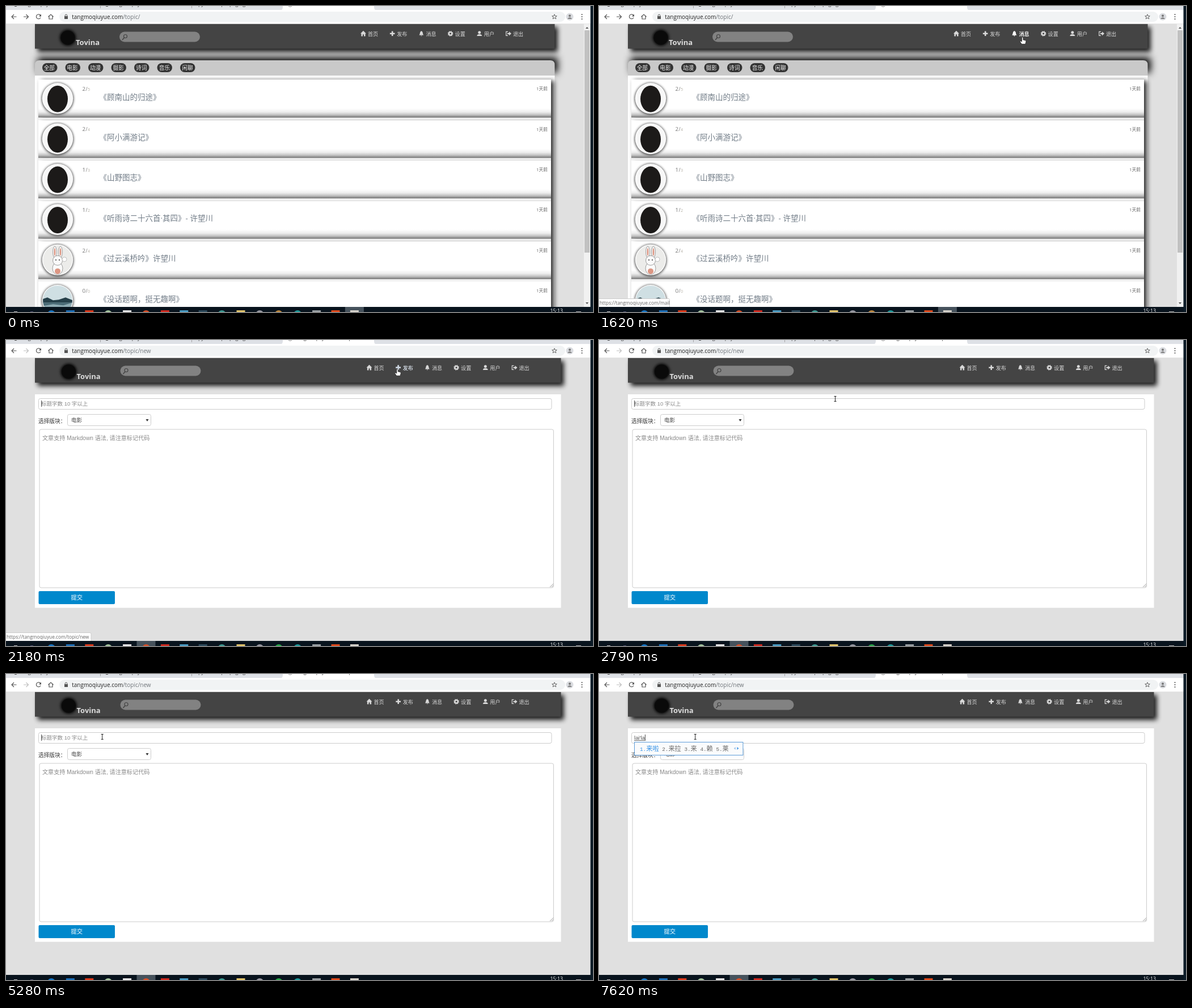
An HTML page for the animation above (8 s loop, 1035x541 px).

```html
<!DOCTYPE html>
<html lang="zh-CN">
<head>
<meta charset="utf-8">
<style>
html, body { margin: 0; width: 100%; height: 100%; overflow: hidden; background: #e0e0e0; }
svg { display: block; width: 1035px; height: 541px; }
text { font-family: "Open Sans", "Noto Sans CJK SC", sans-serif; white-space: pre; }
.form { font-family: "Liberation Sans", "Noto Sans CJK SC", sans-serif; }
.mono { font-family: "Liberation Mono", monospace; }
</style>
</head>
<body>
<svg id="stage" viewBox="0 0 1035 541">
  <defs>
    <linearGradient id="fade" x2="0" y2="1">
      <stop offset="0" stop-opacity="0"/>
      <stop offset=".4" stop-opacity=".07"/>
      <stop offset=".7" stop-opacity=".24"/>
      <stop offset="1" stop-opacity=".55"/>
    </linearGradient>
    <clipPath id="round"><circle r="26"/></clipPath>
  </defs>
  <g id="list"></g>
  <g id="form"></g>
  <g id="live"></g>
</svg>
<script>
const $ = id => document.getElementById(id);
const rect = (x, y, w, h, fill, more = '') =>
  `<rect x="${x}" y="${y}" width="${w}" height="${h}" fill="${fill}" ${more}/>`;
const text = (x, y, s, size, fill, more = '') =>
  `<text x="${x}" y="${y}" font-size="${size}" fill="${fill}" ${more}>${s}</text>`;
const circle = (x, y, r, fill, more = '') =>
  `<circle cx="${x}" cy="${y}" r="${r}" fill="${fill}" ${more}/>`;
const path = (d, fill, more = '') => `<path d="${d}" fill="${fill}" ${more}/>`;
const line = (d, stroke, width = 1.2) => path(d, 'none', `stroke="${stroke}" stroke-width="${width}"`);
const at = (x, y, s) => `<g transform="translate(${x} ${y})">${s}</g>`;
const blur = (sd, alpha = 1) => `style="filter:blur(${sd}px);opacity:${alpha}"`;

const site = 'tangmoqiuyue.com';

// Site header

const menu = [
  ['首页', '/', path('M-5 0L0-5 5 0H3.6V4.6H1V1.5H-1V4.6H-3.6V0Z', 'currentColor')],
  ['发布', '/topic/new', path('M-1.3-4.3H1.3V-1.3H4.3V1.3H1.3V4.3H-1.3V1.3H-4.3V-1.3H-1.3Z', 'currentColor')],
  ['消息', '/mail', path('M-4 2.8C-2 1-3.2-4 0-4.6 3.2-4 2 1 4 2.8ZM-1.2 3.4H1.2L0 4.6Z', 'currentColor')],
  ['设置', '/setting', circle(0, 0, 2.7, 'none', 'stroke="currentColor" stroke-width="2.4"') +
    circle(0, 0, 4.1, 'none', 'stroke="currentColor" stroke-width="1.4" stroke-dasharray="1.61"')],
  ['用户', '/profile', circle(0, -2, 2.5, 'currentColor') + path('M-4.5 4.2C-4.5-.3 4.5-.3 4.5 4.2Z', 'currentColor')],
  ['退出', '/signout', line('M-1-3.5H-4.2V3.5H-1', 'currentColor') + path('M-2-1.1H1V-3.6L5 0 1 3.6V1.1H-2Z', 'currentColor')],
];

const menuItem = (i, dx, color) => {
  const [label, , icon] = menu[i], x = 630 + dx + i * 51.2;
  return `<g color="${color}">${at(x, 48.8, icon)}${text(x + 8, 53, label, 9.1, color)}</g>`;
};

const header = (width, dx, menuDx) =>
  rect(56, 37, width, 44, '#000', blur(4.5, .9)) +
  rect(51, 31, width, 44.5, '#444') +
  circle(109 + dx, 56, 14, '#000', blur(2.5)) +
  circle(109 + dx, 56, 12.5, '#0a0a0a') +
  text(123 + dx, 69, 'Tovina', 13, '#ddd', 'font-weight="700"') +
  rect(200 + dx, 45.5, 142, 18, '#828282', 'rx="9"') +
  circle(210.5 + dx, 53.5, 3, 'none', 'stroke="#444" stroke-width="1.2"') +
  line(`M${208.5 + dx} 56l-3.5 4`, '#444', 1.5) +
  menu.map((_, i) => menuItem(i, menuDx, '#d8d8d8')).join('');

// Topic list

const catPic = circle(0, 0, 26, '#f7f7f7') + '<ellipse cx="0" cy="1" rx="18" ry="23.5" fill="#1c1a19"/>';
const rabbitPic = circle(0, 0, 26, '#ececea') +
  `<g fill="#fafafa" stroke="#777" stroke-width=".7">
    <ellipse cx="-5" cy="-14" rx="3.4" ry="10"/><ellipse cx="5" cy="-14" rx="3.4" ry="10"/>
    <ellipse cx="0" cy="15" rx="9" ry="11"/><circle cy="1" r="8.5"/></g>
  <g fill="#dc9683"><ellipse cx="-5" cy="-14" rx="1.4" ry="7"/><ellipse cx="5" cy="-14" rx="1.4" ry="7"/>
    <circle cy="20" r="5"/></g>` +
  circle(-3, 0, 1, '#333') + circle(3, 0, 1, '#333') +
  circle(12, -1, 4, '#fff', 'stroke="#999" stroke-width=".6"');
const lakePic = rect(-26, -26, 52, 52, '#cfdfe3') + rect(-26, 2, 52, 26, '#8fabb3') +
  path('M-27-2L-18-5-8 0 2-1 14-5 27 0V4H-27Z', '#26404a') + path('M-27 4H27L10 9-8 7-27 10Z', '#4b6b76');

const topics = [
  ['《顾南山的归途》', 2, 5, catPic],
  ['《阿小满游记》', 2, 4, catPic],
  ['《山野图志》', 1, 3, catPic],
  ['《听雨诗二十六首·其四》- 许望川', 1, 2, catPic],
  ['《过云溪桥吟》许望川', 2, 4, rabbitPic],
  ['《没话题啊，挺无趣啊》', 0, 0, lakePic],
];

const topicRow = ([title, replies, views, pic], i) => at(0, 130 + i * 71.4,
  rect(57, 0, 904, 67.3, '#fff') +
  rect(57, 51, 904, 16.3, 'url(#fade)') +
  rect(57, 67.3, 904, 4.1, '#f0f0f0') +
  circle(91, 34, 28, '#000', blur(2, .75)) +
  circle(91, 33.3, 27.2, '#fff') +
  at(91, 33.3, `<g clip-path="url(#round)">${pic}</g>`) +
  text(134.5, 20, replies, 9.8, '#777') +
  text(140.5, 20, '/', 8.5, '#777') +
  text(144, 20, views, 7.2, '#b5b1a6') +
  text(164.5, 35.5, title, 13.5, '#717c87') +
  text(935, 19.3, '1天前', 7.8, '#666'));

const boards = ['全部', '电影', '动漫', '摄影', '诗词', '音乐', '闲聊'];
const boardTab = (name, i) =>
  rect(64 + i * 40.5, 101, 26.5, 16, '#333', 'rx="8"') + text(66.7 + i * 40.6, 112.8, name, 9.7, '#eee');

const scrollbar = rect(1019, 31, 11, 501, '#f1f1f1') + rect(1020, 43, 9, 393, '#c1c1c1') +
  path('M1022 40h5l-2.5-3z', '#505050') + path('M1022 524h5l-2.5 3z', '#505050');

$('list').innerHTML = rect(0, 31, 1035, 510, '#e0e0e0') +
  rect(56, 91, 916.5, 27, '#000', blur(6.5)) +
  header(916.5, 0, 0) +
  rect(51, 123, 916.5, 418, '#fff') +
  rect(62, 132, 904, 430, '#000', blur(4.5, .85)) +
  path('M51 123V104Q51 96 59 96H959.5Q967.5 96 967.5 104V123Z', '#c9c9c9') +
  boards.map(boardTab).join('') + topics.map(topicRow).join('') + scrollbar;

// New topic form

const field = (x, y, w, h) => rect(x, y, w, h, '#fff', 'rx="3" stroke="#ccc"');

$('form').innerHTML = rect(0, 31, 1035, 510, '#e0e0e0') + header(927.5, 1.5, 10.5) +
  rect(51, 96, 927.5, 377.5, '#fff') +
  field(57.5, 103.5, 904.5, 19) +
  text(57, 147.3, '选择版块：', 9.7, '#333') +
  field(108.5, 131.5, 147, 20) +
  text(115, 145, '电影', 9.6, '#444') +
  path('M246.5 140h5l-2.5 4z', '#333') +
  field(59, 158, 906.5, 280) +
  text(64, 176.8, '文章支持 Markdown 语法, 请注意标记代码', 10.12, '#888', 'class="form"') +
  line('M959 437l6-6M962 437l3-3', '#888', .8) +
  rect(57.5, 444, 134.5, 23, '#08c', 'rx="2"') +
  text(124.7, 459.3, '提交', 10.3, '#fff', 'text-anchor="middle"');

// Typing with input method

const typed = [
  [5510, 'l', '了 来 里 啦 楼'],
  [5600, 'la', '啦 拉 辣 蜡 腊'],
  [5830, 'lai', '来 赖 莱 濑 lain'],
  [6840, "lai'l", '来了 来啦 来咯 来历 来路'],
  [7620, "lai'la", '来啦 来拉 来 赖 莱'],
];
const caretOff = [[3720, 4270], [4750, 5280], [6380, 6840], [7390, 7620]];
const em = { l: .222, a: .556, i: .222, "'": .191 };
const half = 5.6;

function candidates(words) {
  let x = 72, out = '';
  words.split(' ').forEach((word, i) => {
    const color = i ? '#666' : '#2f8fe6', latin = /^[a-z]/.test(word);
    out += text(x, 135.7, `${i + 1}.`, 9.33, color, 'class="mono"');
    out += text(x + 2 * half, 135.7, word, latin ? 9.33 : 11.2, color, latin ? 'class="mono"' : '');
    x += half * (3 + word.length * (latin ? 1 : 2));
  });
  const w = x + 19.5 - 62.5;
  return rect(62.5, 120.5, w, 23, '#fafbfc', 'stroke="#5b9bd8"') + out +
    path(`M${x + 6.5} 129v5l-3.2-2.5z`, '#a5c8ea') + path(`M${x + 9} 129v5l3.2-2.5z`, '#4a9be8');
}

function titleInput(t) {
  const [, word, words] = typed.findLast(k => t >= k[0]) || [0, ''];
  const width = [...word].reduce((sum, c) => sum + em[c] * 9.6, 0);
  const caret = !caretOff.some(([a, b]) => t >= a && t < b);
  return (word
    ? text(62, 115.7, word, 9.6, '#555', 'class="form"') + rect(62, 117, width, .9, '#555') + candidates(words)
    : text(62, 115.7, '标题字数 10 字以上', 9.5, '#888', 'class="form"')) +
    (caret ? rect(62 + width, 107, .9, 11, '#333') : '');
}

// Pointer: start, end, number of steps, from x, y, to x, y

const moves = [
  [380, 530, 3, 905, 472, 742, 106],
  [690, 930, 4, 750, 95, 898, 48],
  [1080, 1850, 11, 879, 64.5, 690, 51],
  [2400, 3180, 11, 680, 62, 153, 146],
  [3260, 3420, 3, 160, 130, 169.7, 111],
];

function pointer(t) {
  const m = moves.findLast(k => t >= k[0]);
  if (!m) return null;
  const [a, b, n, x0, y0, x1, y1] = m;
  const k = Math.min(1, Math.floor((t - a) / (b - a) * (n - 1) + .001) / (n - 1));
  return { x: x0 + (x1 - x0) * k, y: y0 + (y1 - y0) * k };
}

const outline = 'stroke="#222" stroke-width=".8" stroke-linejoin="round"';
const hand = path('M-1.2 1C-1.2-.5 1.2-.5 1.2 1V4.8L5.3 5.8C6.4 6.2 6.4 7.5 6 9L5 12.3H-1.4L-4.2 8.2C-4.6 7-3.2 6.3-1.2 8Z', '#fff', outline);
const arrow = path('M0 0V10.5L2.4 8.2 4 11.8 5.6 11 4 7.6H7.3Z', '#fff', outline);
const beam = line('M-2-4.5H2M0-4.5V4.5M-2 4.5H2', '#222', 1);

// Browser frame and taskbar

const tabTitle = (x, s) => text(x, 0, s, 9, '#444');
const reload = line('M4-2A4 4 0 1 0 4 1.5', '#555') + path('M5-4.5V-.5H1Z', '#555');
const stop = line('M-3.5-3.5L3.5 3.5M-3.5 3.5L3.5-3.5', '#555', 1.3);

const browser = (fresh, loading) =>
  rect(0, 0, 1035, 8, '#dee1e6') + rect(0, 7, 1035, 24.5, '#fff') + rect(0, 31, 1035, .7, '#ddd') +
  path('M484 7.5Q488 7 488 2V0H649V2Q649 7 653 7.5Z', '#fff') +
  circle(17, -2, 3, '#333') + circle(178, -2, 3, '#333') +
  tabTitle(25, 'tangmoqiuyue/bbs') + tabTitle(186, 'tangmoqiuyue') + tabTitle(339, 'python topic paging') +
  rect(166, 0, .8, 4, '#999') + rect(327, 0, .8, 4, '#999') +
  circle(501, -2, 3.5, 'none', 'stroke="#999"') + (fresh ? tabTitle(511, site + '/topic/new') : '') +
  at(14, 19, line('M4.5 0H-4M0-4L-4 0 0 4', '#555')) +
  at(35.5, 19, line('M-4.5 0H4M0-4L4 0 0 4', fresh ? '#c0c0c0' : '#555')) +
  at(57, 19, loading ? stop : reload) +
  at(79, 19, line('M-4.5 0L0-4 4.5 0M-3-1V4H3V-1', '#555')) +
  rect(94, 10, 892, 18, '#f1f3f4', 'rx="9"') +
  at(106, 19, rect(-3, -1, 6, 5, '#555') + line('M-1.8-1V-2.2A1.8 1.8 0 0 1 1.8-2.2V-1', '#555', 1)) +
  text(116.3, 22.5, `${site}<tspan fill="#70757a">/topic/${fresh ? 'new' : ''}</tspan>`, 9.95, '#222') +
  at(967, 19, line('M0-4.3L1.2-1.3 4.3-1.3 1.8.7 2.8 3.8 0 2-2.8 3.8-1.8.7-4.3-1.3-1.2-1.3Z', '#555', .9)) +
  circle(994, 19, 6.5, '#dadce0') + circle(994, 17.3, 2, '#777') + path('M990 22.7Q994 18 998 22.7Z', '#777') +
  [15, 19, 23].map(y => circle(1015.5, y, 1.1, '#555')).join('');

// Taskbar icons are squares (s) or circles (c)
const apps = [
  ['c', '#1878c8'], ['s', '#1d6fb8'], ['s', '#dd3a1c'], ['c', '#a8c8a0'], ['s', '#e8e8e8'], ['c', '#d8512a'],
  ['s', '#d02a20'], ['s', '#4a9cc4'], ['s', '#2d4a5c'], ['c', '#3f9c94'], ['s', '#e2c56c'], ['c', '#9a9aa4'],
  ['c', '#c08a40'], ['c', '#1f9c9c'], ['s', '#9aa0a4'], ['s', '#e04a1c'], ['s', '#d8d4cc'],
];
const app = (active, fresh) => ([kind, color], i) => {
  const x = 80 + i * 33.4, fill = i === 12 && fresh ? '#2aa84a' : color;
  return (i === active ? rect(x - 16.5, 532, 33, 9, '#46525c') : '') +
    (kind === 's' ? rect(x - 7.5, 538, 15, 6, fill) : circle(x, 545, 7, fill));
};

const taskbar = fresh => rect(0, 532, 1035, 9, '#08131d') +
  rect(14, 540, 6, 1, '#ccc') + rect(43, 540, 5, 1, '#557') +
  apps.map(app(fresh ? 5 : 16, fresh)).join('') +
  text(959.5, 542, '15:13', 8.8, '#eee') + rect(1005, 540, 9, 1, '#bbb') +
  rect(1030.5, 0, 4.5, 541, '#0b1a26');

const status = address => {
  const w = address === '/topic/new' ? 150 : 104 + address.length * 4.1;
  return path(`M-1 533V517.5H${w - 2}Q${w} 517.5 ${w} 519.5V533Z`, '#fff', 'stroke="#ccc"') +
    text(1, 528, `https://${site}${address}`, 8.35, '#666');
};

function scene(t) {
  const clicked = t >= 1930, fresh = t >= 2020, onForm = t >= 2180;
  const p = pointer(t), shift = onForm ? 10.5 : 0;
  const hover = p && p.y < 72 && t < 2480 ? Math.floor((p.x - 624 - shift) / 51.2) : -1;
  let out = onForm ? titleInput(t) : '';
  if (menu[hover]) {
    out += menuItem(hover, shift, onForm ? '#c8d2de' : '#fff');
    if (t >= 1080) out += status(menu[hover][1]);
  }
  out += browser(fresh, fresh && !onForm) + taskbar(clicked);
  if (t >= 3490 && t < 3570) out += circle(168.8, 111, 8, '#ffee33', 'opacity=".85"');
  if (p) {
    const inField = onForm && p.x > 57 && p.x < 962 && (p.y > 103 && p.y < 122 || p.y > 158);
    out += at(p.x, p.y, menu[hover] ? hand : inField ? beam : arrow);
  }
  return out;
}

let last;
function frame(now) {
  const t = now % 8000, markup = scene(t);
  $('list').style.display = t < 2180 ? '' : 'none';
  $('form').style.display = t < 2180 ? 'none' : '';
  if (markup !== last) $('live').innerHTML = last = markup;
  requestAnimationFrame(frame);
}
frame(0);
</script>
</body>
</html>
```
